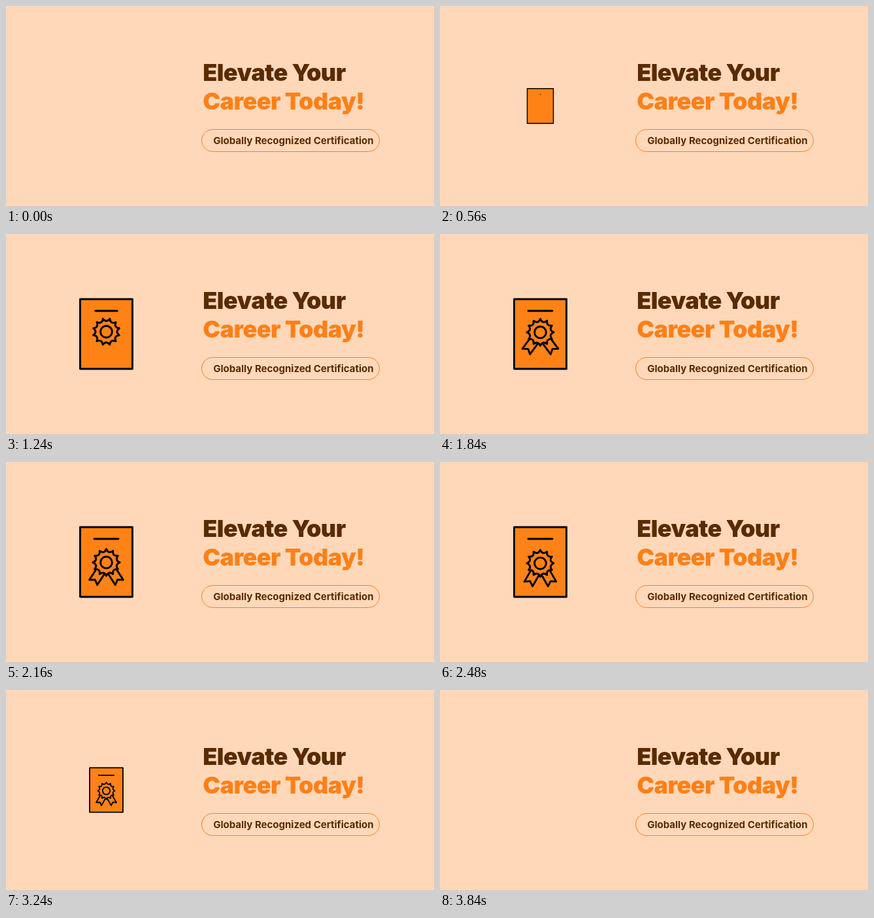
These frames come from a looping animation (655x307 px, 3.88 s). An HTML page:

```html
<!DOCTYPE html>
<html lang="en">
<head>
<meta charset="utf-8">
<title>Elevate Your Career</title>
<style>
  html, body { margin: 0; width: 100%; height: 100%; overflow: hidden; background: #ffd8ba; }
  svg { display: block; width: 655px; height: 307px; }
  text { font-family: Inter, sans-serif; fill: #5a2b00; }
  .title { font-size: 36px; font-weight: 900; letter-spacing: -0.55px; }
  .label { font-size: 15px; font-weight: 700; }
  .title.accent { fill: #ff8017; }
  #card { fill: #ff8217; stroke: #000; stroke-width: 2.9; stroke-linejoin: round; stroke-linecap: round; }
</style>
</head>
<body>
<svg viewBox="0 0 655 307">
  <rect width="655" height="307" fill="#ffd8ba"/>
  <text class="title" x="301.2" y="115.3">Elevate Your</text>
  <text class="title accent" x="301.2" y="159.3">Career Today!</text>
  <rect x="299.5" y="189.5" width="272" height="34" rx="17" fill="none" stroke="#ff8017"/>
  <text class="label" x="317.2" y="212">Globally Recognized Certification</text>
  <g id="card">
    <rect x="-40" y="-53.5" width="80" height="107"/>
    <path id="line"/>
    <g id="seal">
      <path id="left"/>
      <path id="right"/>
      <g id="badge">
        <path id="burst"/>
        <circle r="8.9"/>
      </g>
    </g>
  </g>
</svg>
<script>
const LOOP = 3880, STEP = 40;
const HOLDS = [1, 15, 30, 59]; // steps that repeat the one before
const el = id => document.getElementById(id);
const set = (id, name, value) => el(id).setAttribute(name, value);
const show = (id, on) => set(id, "visibility", on ? "inherit" : "hidden");

const ramp = (t, from, to) => Math.min(1, Math.max(0, (t - from) / (to - from)));
const smooth = (t, from, to) => {
  const u = ramp(t, from, to);
  return u * u * (3 - 2 * u);
};

// Same curve as cubic-bezier(0.8, 0, 0.2, 1).
function ease(t, from, to) {
  const x = ramp(t, from, to);
  let lo = 0, hi = 1;
  for (let i = 0; i < 30; i++) {
    const s = (lo + hi) / 2, r = 1 - s;
    if (2.4 * s * r * r + 0.6 * s * s * r + s * s * s < x) lo = s;
    else hi = s;
  }
  return lo * lo * (3 - 2 * lo);
}

function burstPath(points, tip, dip) {
  const at = (r, i) => {
    const a = i * Math.PI / points;
    return `${(r * Math.sin(a)).toFixed(2)} ${(-r * Math.cos(a)).toFixed(2)}`;
  };
  let d = "M" + at(tip, 0);
  for (let i = 1; i < points * 2; i += 2) d += `Q${at(dip, i)} ${at(tip, i + 1)}`;
  return d + "Z";
}

function draw(time) {
  let step = Math.floor((time % LOOP) / STEP);
  if (HOLDS.includes(step)) step--;
  const t = step * STEP;

  const scale = ease(t, 0, 1120) - ease(t, 2672, LOOP);
  set("card", "transform", `translate(153.5 153.5) scale(${scale})`);
  show("card", scale > 0.001);

  const half = 18.5 * smooth(t, 540, 1400);
  show("line", half > 0);
  set("line", "d", `M${-half} -35.5H${half}`);

  const pop = smooth(t, 600, 1200);
  show("seal", pop > 0);
  set("seal", "transform", `translate(0 ${-3.5 + 5.5 * smooth(t, 1640, 2400)}) scale(${pop})`);
  set("badge", "transform", `rotate(${-15 * (1 - smooth(t, 1200, 1760))})`);

  const out = smooth(t, 1220, 1740);
  const len = 11 + 25.5 * out;
  const angle = 36.5 - 7 * smooth(t, 1760, 2560);
  const tail = `M-7.2 0V${len}L0 ${len - 5}L7.2 ${len}V0Z`;
  for (const [id, side] of [["left", 1], ["right", -1]]) {
    show(id, out > 0);
    set(id, "d", tail);
    set(id, "transform", `rotate(${side * angle})`);
  }
}

set("burst", "d", burstPath(12, 20.6, 13));
const start = performance.now();
function tick() {
  draw(performance.now() - start);
  requestAnimationFrame(tick);
}
draw(0);
requestAnimationFrame(tick);
</script>
</body>
</html>
```
